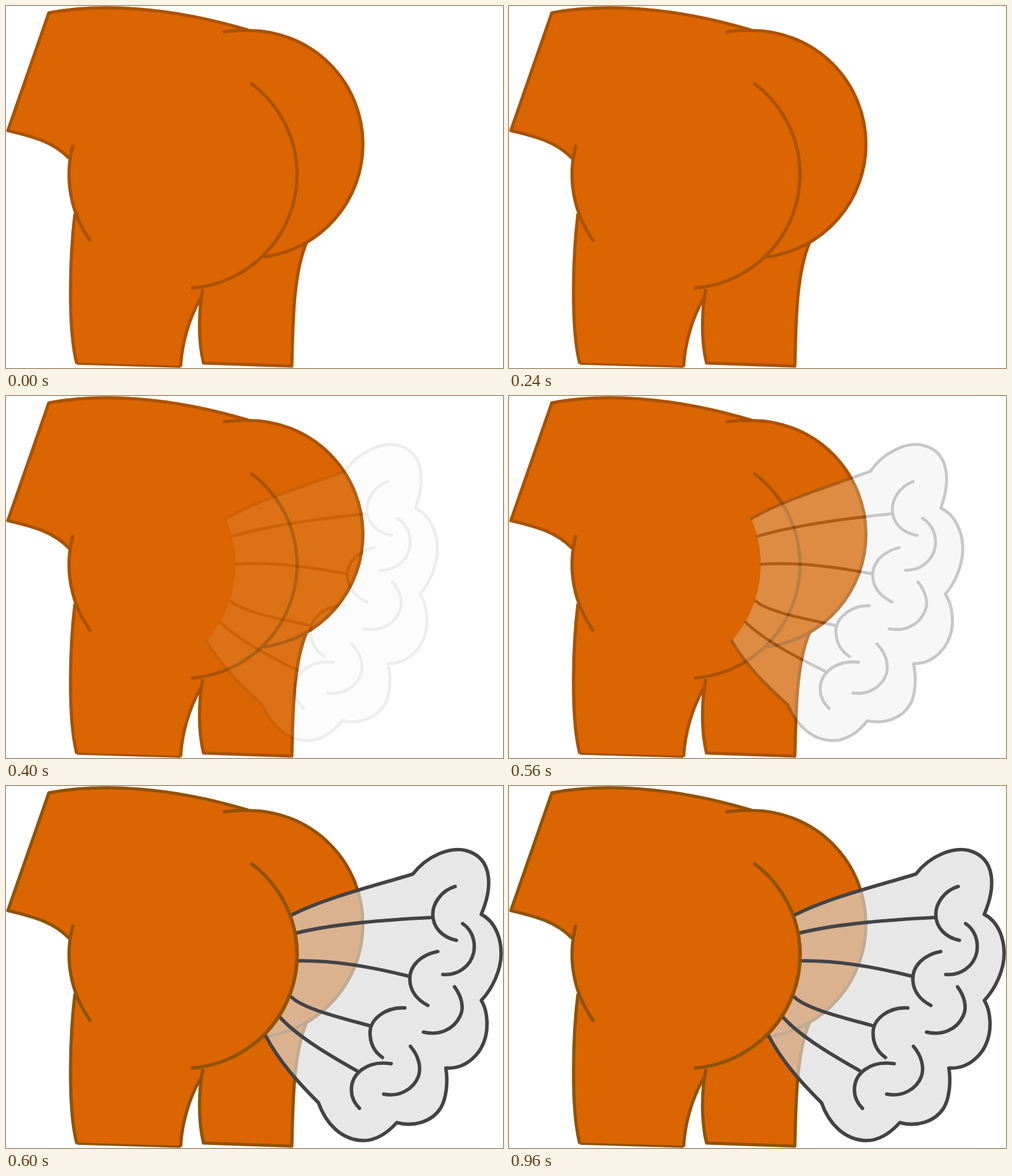
Animation, 800 px wide and 584 px high, one loop 1200 ms. Source, as an HTML page with a canvas:

```html
<!DOCTYPE html>
<html lang="en">
<head>
<meta charset="utf-8">
<title>Puff</title>
<style>
html, body { margin: 0; width: 100%; height: 100%; overflow: hidden; background: #fff; }
canvas { display: block; }
</style>
</head>
<body>
<canvas id="stage" width="800" height="584"></canvas>
<script>
const W = 800, H = 584, LOOP = 1200;
const ctx = document.getElementById('stage').getContext('2d');
const layer = document.createElement('canvas');
layer.width = W;
layer.height = H;
const puff = layer.getContext('2d');

const SKIN = '#db6500', SMOKE = '#e7e7e7', INK = '#434345';
const near = { x: 285, y: 272, r: 183.5 };
const far = { x: 391, y: 223, r: 183.5 };

const torso = 'M102 246C76 219 45 211 3 201L69 11C150-4 260 0 390 39';
const leftLeg = 'M111 335C103 400 99 520 114 577';
const leftFoot = 'M114 577L281 582';
const leftInside = 'M281 582C283 545 294 505 313 472';
const rightLeg = 'M317 456C310 490 309 540 318 576L460 581C462 520 461 435 484 381';

const bodyFills = [
  torso + 'L285 272Z',
  leftLeg + 'L281 582C283 545 294 505 313 472L317 456L300 400Z',
  rightLeg + 'L400 380Z'
].map(d => new Path2D(d));
const bodyLines = [torso, leftLeg, leftInside, rightLeg, 'M349 42Q368 38.5 391 39.5']
  .map(d => new Path2D(d));
const footLine = new Path2D(leftFoot);

const rim = 'M460 208C515 180 590 162 655 142' +
  'C678 112 715 98 740 104C785 116 783 165 765 207' +
  'C790 220 797 250 797 270C797 297 783 327 765 346' +
  'C774 360 775 380 774 392C770 432 740 457 708 455' +
  'C712 480 708 505 700 519C685 543 655 550 629 543' +
  'C612 562 594 572 575 572C540 571 515 545 503 511' +
  'C470 478 440 445 418 403';
const cloudFill = new Path2D(rim + 'A186 186 0 0 0 460 208Z');
const cloudLines = new Path2D(rim +
  // jets
  'M468 237C530 222 610 216 687 212' +
  'M471 282C530 281 590 292 649 307' +
  'M460 341C480 360 540 374 586 387' +
  'M442 374C470 405 525 437 564 459' +
  // curls
  'M723 162C700 169 687 190 687 207C687 228 702 244 725 249' +
  'M735 222C750 232 756 250 753 268C748 292 726 306 703 304' +
  'M695 267C668 272 649 290 650 313C651 332 662 345 679 354' +
  'M722 324C733 339 738 357 731 371C721 393 697 403 672 397' +
  'M642 358C610 356 586 377 586 398C586 415 593 429 606 438' +
  'M651 420C663 434 669 452 664 468C656 490 632 502 608 497' +
  'M620 448C580 442 556 465 556 490C556 502 561 512 569 520');

function arc(c, from, to) {
  const angle = p => Math.atan2(p[1] - c.y, p[0] - c.x);
  ctx.beginPath();
  ctx.arc(c.x, c.y, c.r, angle(from), angle(to));
  ctx.stroke();
}

function disc(c) {
  ctx.beginPath();
  ctx.arc(c.x, c.y, c.r, 0, Math.PI * 2);
  ctx.fill();
}

function nearCurve() {
  arc(near, [393, 125], [298, 456]);
}

function drawBody(line) {
  ctx.fillStyle = SKIN;
  bodyFills.forEach(p => ctx.fill(p));
  disc(far);
  disc(near);
  ctx.strokeStyle = line;
  ctx.lineWidth = 5.2;
  ctx.lineCap = 'butt';
  ctx.lineJoin = 'round';
  bodyLines.forEach(p => ctx.stroke(p));
  arc(far, [391, 39], [415, 404]);
  arc(near, [136, 380], [108, 224]);
  nearCurve();
  ctx.lineWidth = 3.6;
  ctx.stroke(footLine);
  ctx.lineWidth = 5.2;
}

function drawCloud({ shift, tilt, fillAlpha, alpha }) {
  puff.setTransform(1, 0, 0, 1, 0, 0);
  puff.clearRect(0, 0, W, H);
  if (tilt) puff.setTransform(1, -0.053, 0.053, 1, shift, 14.3);
  puff.globalAlpha = fillAlpha;
  puff.fillStyle = SMOKE;
  if (!tilt) puff.fillStyle = '#dadada';
  puff.fill(cloudFill);
  puff.globalAlpha = 1;
  puff.strokeStyle = INK;
  puff.lineWidth = tilt ? 4.8 : 5.6;
  puff.lineCap = puff.lineJoin = 'round';
  puff.stroke(cloudLines);
  ctx.globalAlpha = alpha;
  ctx.drawImage(layer, 0, 0);
  ctx.globalAlpha = 1;
}

const stages = [
  { until: 400 },
  { until: 500, cloud: { shift: -117, tilt: true, fillAlpha: 1, alpha: 0.09 } },
  { until: 600, cloud: { shift: -81, tilt: true, fillAlpha: 1, alpha: 0.29 } },
  { until: LOOP, full: true, cloud: { shift: 0, tilt: false, fillAlpha: 0.655, alpha: 1 } }
];

function draw(ms) {
  const { cloud, full } = stages.find(s => ms < s.until);
  ctx.fillStyle = '#fff';
  ctx.fillRect(0, 0, W, H);
  drawBody(full ? '#915204' : '#aa5200');
  if (cloud) drawCloud(cloud);
  if (full) nearCurve();
}

const start = performance.now();
function tick() {
  draw((performance.now() - start) % LOOP);
  requestAnimationFrame(tick);
}
tick();
</script>
</body>
</html>
```
